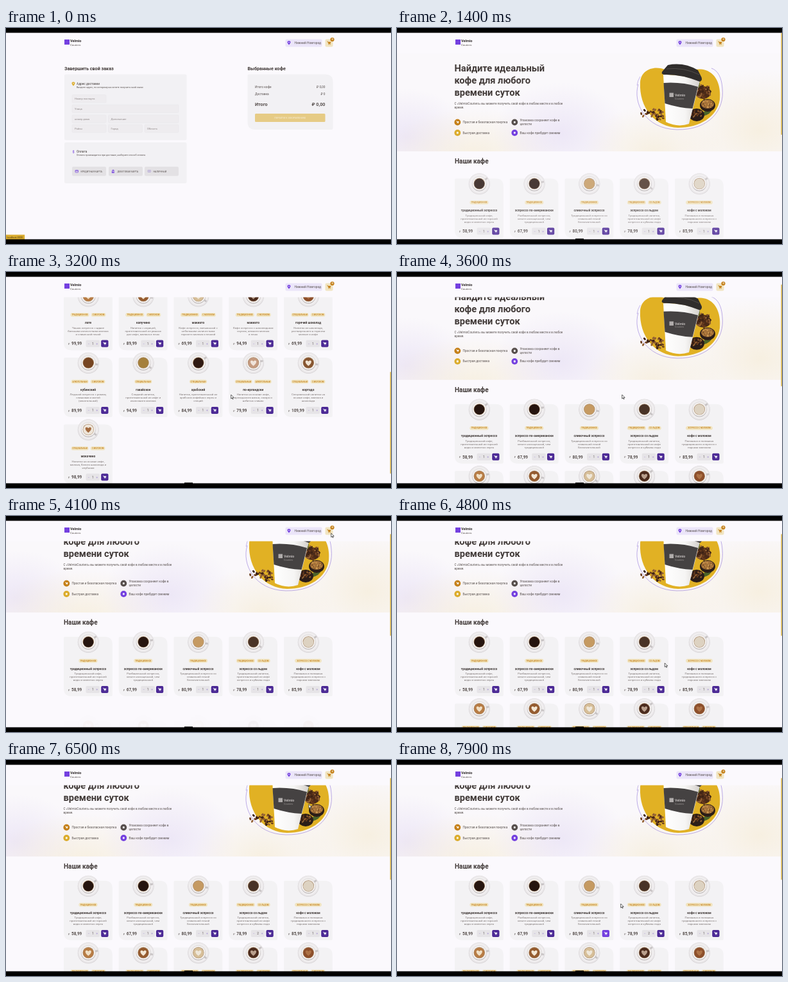
An HTML page that plays this animation: 600x338 px, repeating every 8 s.

```html
<!DOCTYPE html>
<html lang="ru">
<head>
<meta charset="utf-8">
<style>
html, body { margin: 0; width: 100%; height: 100%; overflow: hidden; background: #000; }
svg { display: block; width: 600px; height: 338px; }
text { font-family: Roboto, "Noto Sans", sans-serif; }
</style>
</head>
<body>
<svg id="stage" viewBox="0 0 600 338"></svg>
<script>
const PURPLE = '#7440df', DEEP = '#4b2995', BROWN = '#c47f17', GOLD = '#dbac2c', INK = '#574f4d', DARK = '#403937';
const ROW = 104.5, COL = 85.75;

const rect = (x, y, w, h, fill, r = 0, extra = '') =>
  `<rect x="${x}" y="${y}" width="${w}" height="${h}" rx="${r}" fill="${fill}" ${extra}/>`;
const dot = (x, y, r, fill, extra = '') => `<circle cx="${x}" cy="${y}" r="${r}" fill="${fill}" ${extra}/>`;
const oval = (x, y, rx, ry, fill, extra = '') =>
  `<ellipse cx="${x}" cy="${y}" rx="${rx}" ry="${ry}" fill="${fill}" ${extra}/>`;
const path = (d, fill, extra = '') => `<path d="${d}" fill="${fill}" ${extra}/>`;
const text = (x, y, size, str, fill = INK, weight = 400, anchor = 'start', extra = '') =>
  `<text x="${x}" y="${y}" font-size="${size}" fill="${fill}" font-weight="${weight}" text-anchor="${anchor}" ${extra}>${str}</text>`;

// Panel with large top-right and bottom-left corners
const leaf = (x, y, w, h, fill) => path(
  `M${x + 2} ${y}h${w - 14}q12 0 12 12v${h - 14}q0 2-2 2h${14 - w}q-12 0-12-12v${14 - h}q0-2 2-2z`, fill);
const cart = (x, y, s, color) => `<g transform="translate(${x} ${y}) scale(${s})">` +
  path('M-3-2.6h1.2l1.2 3.5h2.7l.9-2.5h-4.3', color, `stroke="${color}" stroke-width=".7"`) +
  dot(-.3, 2.2, .6, color) + dot(2, 2.2, .6, color) + '</g>';
const pin = (x, y, color) => path(`M${x} ${y + 3}c-5-5.5-1-6.5 0-6.2c1-.3 5 .7 0 6.2z`, color) +
  dot(x, y - 1, .8, '#fff');

function header() {
  return rect(0, 7, 600, 32.5, '#fbf9fd') + rect(91, 18, 8, 8, PURPLE) +
    text(100, 22.3, 5.5, 'Velmio', '#2f2a2a', 700) + text(100, 27.8, 4.4, 'Couriers', INK) +
    rect(435.5, 17.5, 57, 12, '#ebe5f9', 2) + pin(441, 23.5, PURPLE) +
    text(449.5, 25.3, 4.85, 'Нижний Новгород', INK) +
    rect(497.5, 17.5, 12, 12, '#f1e5c2', 2) + cart(503.2, 23.6, .95, BROWN) +
    dot(508.5, 18, 3.1, BROWN) + text(508.5, 19.4, 3.9, '0', '#fff', 700, 'middle', 'id="badge"');
}

function checkout() {
  const field = (x, y, w, label) =>
    rect(x, y, w, 12.5, '#eeecef', 1.5, 'stroke="#e7e5e9" stroke-width=".5"') +
    text(x + 4, y + 7.7, 4.1, label, '#8d8686');
  const pay = (x, icon, label) => rect(x, 217, 53, 14.5, '#e3e1e4', 2) + icon +
    text(x + 13.5, 225.6, 3.6, label, INK);
  const line = (y, size, a, b, weight) => text(388, y, size, a, INK, weight) +
    text(497.5, y, size, b, INK, weight, 'end');
  return text(91, 66.3, 7.2, 'Завершить свой заказ', DARK, 600) +
    text(376.5, 66.3, 7.2, 'Выбранные кофе', DARK, 600) +
    rect(91, 72.5, 190.5, 103, '#f2f1f4', 2) + rect(91, 179, 190.5, 64, '#f2f1f4', 2) +
    pin(105, 87.8, GOLD) + text(110, 89.3, 4.8, 'Адрес доставки', DARK) +
    text(110, 94.3, 3.7, 'Введите адрес, по которому вы хотите получить свой заказ') +
    field(103, 104.5, 53, 'Номер паспорта') + field(103, 120, 166, 'Улица') +
    field(103, 136, 53, 'номер дома') + field(159.5, 136, 109.5, 'Дополнение') +
    field(103, 151, 53, 'Район') + field(159.5, 151, 53, 'Город') + field(216, 151, 53, 'Область') +
    text(105, 196, 5.5, '$', PURPLE, 500, 'middle') + text(110, 195.3, 4.8, 'Оплата', DARK) +
    text(110, 200.3, 3.7, 'Оплата производится при доставке, выберите способ оплаты') +
    pay(103, rect(108, 222.5, 4.5, 3.5, 'none', .5, `stroke="${PURPLE}" stroke-width=".7"`) +
      rect(108, 223.5, 4.5, .7, PURPLE), 'КРЕДИТНАЯ КАРТА') +
    pay(160, path('M164.5 223.5l2.5-2 2.5 2zm.6.5h.9v2h.7v-2h.9v2h.7v-2h.5v3h-4z', PURPLE), 'ДЕБЕТОВАЯ КАРТА') +
    pay(216, rect(221, 222.5, 4.5, 3, 'none', .3, 'stroke="#a18fd0" stroke-width=".6"') +
      dot(223.2, 224, .8, '#a18fd0'), 'НАЛИЧНЫЙ') +
    leaf(376.5, 72.5, 133, 86.5, '#f2f1f4') +
    line(94.3, 4.8, 'Итого кофе', '₽ 0,00', 400) + line(105, 4.8, 'Доставка', '₽ 0', 400) +
    line(122, 7.2, 'Итого', '₽ 0,00', 700) + rect(388, 134, 109.5, 13, '#e6cb85', 1.5) +
    text(442.7, 142, 3.8, 'ПЕРЕЙТИ К ОФОРМЛЕНИЮ', '#f7eed8', 400, 'middle');
}

function cupScene() {
  let seed = 7;
  const rnd = () => (seed = seed * 16807 % 2147483647) / 2147483647;
  const beans = (n, x, y, rx, ry, r, colors) => {
    let s = '';
    for (let i = 0; i < n; i++) {
      const a = rnd() * 6.283, d = Math.sqrt(rnd());
      const bx = x + Math.cos(a) * d * rx, by = y + Math.sin(a) * d * ry;
      s += oval(bx.toFixed(1), by.toFixed(1), r, r * .65, colors[i % colors.length],
        `transform="rotate(${Math.round(rnd() * 180)} ${bx.toFixed(1)} ${by.toFixed(1)})"`);
    }
    return s;
  };
  const browns = ['#3a2015', '#6b3d1e', '#936033'], tan = ['#c88f48', '#714821', '#dbaa5d'];
  return path('M379 85C380 66 400 57 420 66C448 76 460 60 481 66C499 72 505 92 503 112C499 139 472 156 438 156C402 155 377 125 379 85z', '#e1b124') +
    path('M376 88C367 117 387 158 436 159C487 160 511 128 507 94C506 78 500 66 490 63', 'none', 'stroke="#a18adf" stroke-width=".7"') +
    path('M374 90q1-8 5-14', 'none', 'stroke="#a18adf" stroke-width=".6"') +
    path('M476 134q7-9 16-8q-3 9-15 12z', '#4d6429') + path('M464 96q2-9 8-11v12z', '#66742f') +
    oval(477, 101, 12, 10, '#4b2a18') + beans(45, 477, 99, 12, 12, 1.8, browns) +
    oval(484, 121, 12, 10, '#2b1d18') + oval(484, 119, 10, 7, '#a47139') + beans(35, 484, 119, 9, 6, 1, tan) +
    oval(467, 136, 12, 10, '#2b1d18') + beans(28, 467, 134, 9, 6, 1.7, browns) +
    beans(24, 397, 134, 18, 8, 2.3, browns) + beans(14, 413, 140, 9, 6, 2.1, browns) +
    path('M415 73Q445 72 472 83L455 150Q437 156 419 147z', 'url(#paper)') +
    path('M415.500 86Q443 84 469 92L460.500 126Q439 125 417.500 118z', '#454242') +
    path('M422 58Q447 53 469 66L474 76Q477 81 472 84Q443 72 416 73Q411 72 413.500 68z', '#302d2c') +
    path('M420 64Q447 61 471 73', 'none', 'stroke="#5a5654" stroke-width=".8"') +
    rect(424.5, 101.5, 6.5, 6.5, '#b0acab') +
    text(433, 107, 5.2, 'Velmio', '#bbb7b6', 600) + text(433, 111.5, 3.8, 'Couriers', '#9b9695');
}

function hero() {
  const feature = (x, y, color, ...lines) => dot(x, y, 4.9, color) +
    (color === BROWN ? cart(x, y, .7, '#fff') : rect(x - 1.4, y - 1.6, 2.8, 3.2, '#fff', 1)) +
    lines.map((s, i) => text(x + 8.2, y + 1.6 + (lines.length - 1) * -2.9 + i * 5.7, 4.8, s)).join('');
  const glow = (x, y, rx, ry, id) => oval(x, y, rx, ry, `url(#${id})`);
  return '<g clip-path="url(#heroClip)">' + rect(0, 7, 600, 186, '#faf8fb') +
    glow(15, 170, 100, 75, 'lilac') + glow(120, 200, 140, 75, 'cream') + glow(255, 165, 105, 80, 'lilac') +
    glow(400, 195, 110, 75, 'cream') + glow(565, 160, 130, 95, 'cream') + '</g>' +
    ['Найдите идеальный', 'кофе для любого', 'времени суток'].map((s, i) =>
      text(89.5, 68 + 19 * i, 14.6, s, DARK, 600)).join('') +
    text(89.5, 120, 4.7, 'С «VelmioCouriers» вы можете получить свой кофе в любом месте и в любое') +
    text(89.5, 126.2, 4.7, 'время.') +
    feature(94.3, 147.5, BROWN, 'Простая и безопасная покупка') +
    feature(183.3, 147.5, INK, 'Упаковка сохраняет кофе в', 'целости') +
    feature(94.3, 164, GOLD, 'Быстрая доставка') +
    feature(183.3, 164, PURPLE, 'Ваш кофе прибудет свежим') + cupScene();
}

// name; tags; description; price; coffee colour; foam colour
const TAGS = { t: 'ТРАДИЦИОННОЕ', m: 'С МОЛОКОМ', i: 'СО ЛЬДОМ', e: 'ЭСПРЕССО С МОЛОКОМ', s: 'СПЕЦИАЛЬНЫЙ', a: 'АЛКОГОЛЬНЫЙ' };
const MENU = `традиционный эспрессо;t;Традиционный кофе,|приготовленный из горячей|воды и молотых зерен;58,99;#26150f
эспрессо по-американски;t;Разбавленный эспрессо,|менее насыщенный, чем|традиционный;67,99;#26150f
сливочный эспрессо;t;Традиционный эспрессо со|сливочной пеной|Безалкогольный;80,99;#c59a62
эспрессо со льдом;ti;Традиционный напиток,|приготовленный из кофе|эспрессо и кубиков льда;78,99;#493326
кофе с молоком;e;Половина и половина|традиционного эспрессо с|парным молоком;85,99;#ddd2c1
лате;tm;Чашка эспрессо с вдвое|большим количеством молока|и сливочной пеной;99,99;#b77c45;#f0dfc4
капучино;tm;Напиток с корицей,|приготовленный из равных|доз кофе, молока и пены;89,99;#955c30;#f3e7d4
макиато;tm;Кофе эспрессо, смешанный с|небольшим количеством|горячего молока и пенкой;69,99;#d6be98;#efe7d9
макиато;tm;Кофе эспрессо с шоколадным|соусом, немного молока|и пены;94,99;#4c2c1e;#b99f8c
горячий шоколад;sm;Напиток из шоколада,|растворенного в горячем|молоке и кофе;69,99;#8d4f2b;#ad7246
кубинский;am;Ледяной эспрессо с ромом,|сливками и мятой|(алкогольный);89,99;#764522
гавайское;s;Сладкий напиток,|приготовленный из кофе и|кокосового молока;94,99;#a5803c
арабский;s;Напиток, приготовленный из|арабских кофейных зерен и|специй;84,99;#301a12
по-ирландски;sa;Напиток на основе кофе,|ирландского виски, сахара и|взбитых сливок;79,99;#c59b80;#f0e4da
кортадо;sm;Специальный напиток на|основе кофе, молока и|шоколада;109,99;#875631;#f1e4d3
мокачино;sm;Напиток на основе кофе,|молока, белого шоколада и|клубники;98,99;#eee5d9;#a36b40`.split('\n').map(s => s.split(';'));

function cup(x, y, coffee, foam, i) {
  const a = -.6 + (i % 4) * .4, hx = x + 14 * Math.cos(a), hy = y + 14 * Math.sin(a);
  return dot(x, y + .5, 16.6, '#d6d3d5') + dot(x, y, 16.2, 'url(#china)') +
    `<path d="M${x} ${y}L${hx} ${hy}" stroke="#c9c5c6" stroke-width="3" stroke-linecap="round"/>` +
    dot(x, y + 1, 11, '#bdb8b9') + dot(x, y, 10.8, '#f3f0ee') + dot(x, y, 8.7, '#a98a6c') + dot(x, y + .2, 8.1, coffee) +
    (foam ? path(`M${x} ${y + 5}C${x - 8} ${y - 1} ${x - 4} ${y - 6} ${x} ${y - 2}C${x + 4} ${y - 6} ${x + 8} ${y - 1} ${x} ${y + 5}z`, foam) : '');
}

function card([name, tags, about, price, coffee, foam], i) {
  const x = 90 + COL * (i % 5), cx = x + 38;
  const labels = [...tags].map(k => TAGS[k]), width = s => s.length * 2.1 + 4;
  let tx = cx - (labels.reduce((sum, s) => sum + width(s), 0) + 3 * (labels.length - 1)) / 2;
  let s = leaf(x, 231, 75.8, 93, '#f3f2f4') + cup(cx + .3, 239, coffee, foam, i);
  for (const label of labels) {
    const w = width(label);
    s += rect(tx, 265.5, w, 6, '#f1e5c2', 3) + text(tx + w / 2, 269.6, 3.1, label, BROWN, 500, 'middle');
    tx += w + 3;
  }
  return s + text(cx, 282.5, 4.85, name, DARK, 700, 'middle') +
    about.split('|').map((line, n) => text(cx, 290.3 + 5 * n, 4.35, line, '#7c7473', 400, 'middle')).join('') +
    text(x + 7, 315.5, 3.5, '₽') + text(x + 12, 315.7, 6.4, price, INK, 700) +
    rect(x + 34.5, 308, 21.5, 11, '#e6e4e7', 2) +
    text(x + 39, 315.2, 4.8, '−', '#9a83cf', 400, 'middle') +
    text(x + 45.3, 315.3, 4.8, '1', INK, 400, 'middle', `id="qty${i}"`) +
    text(x + 51.8, 315.2, 4.8, '+', '#9a83cf', 400, 'middle') +
    rect(x + 58.2, 308, 11.3, 11, DEEP, 2, `id="buy${i}"`) + cart(x + 63.6, 313.6, .82, '#fff');
}

function build() {
  const glow = (id, color) => `<radialGradient id="${id}"><stop stop-color="${color}" stop-opacity=".65"/>
    <stop offset="1" stop-color="${color}" stop-opacity="0"/></radialGradient>`;
  const rows = [0, 1, 2, 3].map(r => `<g id="row${r}">` +
    MENU.slice(r * 5, r * 5 + 5).map((item, c) => card(item, r * 5 + c)).join('') + '</g>').join('');
  return `<defs>${glow('lilac', '#e6def4')}${glow('cream', '#f5ebd3')}
    <radialGradient id="china"><stop offset=".6" stop-color="#d5d1d3"/><stop offset=".8" stop-color="#f3f1f2"/><stop offset="1" stop-color="#e6e3e5"/></radialGradient>
    <linearGradient id="paper"><stop stop-color="#fff"/><stop offset=".6" stop-color="#f6f5f4"/><stop offset="1" stop-color="#d4d0cc"/></linearGradient>
    <clipPath id="heroClip"><rect y="7" width="600" height="186"/></clipPath></defs>` +
    rect(0, 7, 600, 324, '#fbf9fd') + `<g id="order">${checkout()}</g>
    <g id="page">${hero()}${text(90, 211.8, 10, 'Наши кафе', DARK, 600)}${rows}</g>` + header() +
    `<g id="chrome">${rect(598.6, 8, 1.4, 159, '#d9b23f', 0, 'id="thumb"')}${rect(278, 329.5, 13, 2, '#000')}</g>
    <g id="status">${rect(0, 323.5, 29, 7.5, '#d9ab2e', 0, 'id="statusBox"')}${text(1.5, 328.7, 3.7, '', '#4b3a12', 400, 'start', 'id="statusText"')}</g>` +
    path('M0 0v6.2l1.5-1.3 1 2.2 1-.5-1-2.1h2z', '#fff', 'id="cursor" stroke="#222" stroke-width=".7"') +
    rect(0, 0, 600, 7.5, '#000') + rect(0, 330.6, 600, 7.4, '#000');
}

const stage = document.getElementById('stage');
stage.innerHTML = build();
const $ = id => document.getElementById(id);
const clamp = v => Math.max(0, Math.min(1, v));
const show = (id, on) => $(id).style.display = on ? '' : 'none';
const smooth = p => p * p * (3 - 2 * p);

// Keys are [time, value, ...]
function track(keys, t, ease = p => p) {
  let i = 0;
  while (i < keys.length - 2 && t >= keys[i + 1][0]) i++;
  const a = keys[i], b = keys[i + 1], p = ease(clamp((t - a[0]) / (b[0] - a[0])));
  return a.slice(1).map((v, n) => v + (b[n + 1] - v) * p);
}
const SCROLL = [[1850, 0], [2200, 143], [2850, 306], [3250, 306], [3630, 0], [3750, 0], [3950, 42]];
const MOUSE = [[1600, 105, 30], [2000, 351, 195], [3650, 351, 195], [4050, 507, 30], [4500, 507, 28],
  [4900, 401, 271], [5050, 401, 271], [5200, 410, 271], [5550, 410, 271], [5800, 509, 38], [5900, 505, 28],
  [6350, 505, 28], [6900, 325, 271], [7650, 325, 271], [7900, 349, 228], [8000, 353, 222]];

// Address shown while a link is hovered
function hoveredLink(t) {
  if (t < 900) return 'localhost:3000';
  return t >= 4200 && t < 4700 || t >= 6000 && t < 6500 ? 'localhost:3000/checkout' : '';
}

function draw(t) {
  const atHome = t >= 1000, [scroll] = track(SCROLL, t), [mx, my] = track(MOUSE, t, smooth), link = hoveredLink(t);
  show('order', !atHome);
  show('page', atHome);
  show('chrome', atHome);
  show('status', link);
  $('statusText').textContent = link;
  $('statusBox').setAttribute('width', 2.5 + link.length * 1.9);
  $('page').setAttribute('transform', `translate(0 ${-scroll})`);
  $('thumb').setAttribute('y', 8 + scroll * .485);
  [980, t < 3650 ? 2075 : 4080, 2300, 2550].forEach((start, r) => {
    const p = clamp((t - start) / 500);
    $('row' + r).setAttribute('transform', `translate(0 ${r * ROW + 28 * (1 - p)})`);
    $('row' + r).setAttribute('opacity', p);
  });
  $('buy3').setAttribute('fill', t >= 5100 && t < 5900 ? PURPLE : DEEP);
  $('buy2').setAttribute('fill', t >= 6850 ? PURPLE : DEEP);
  $('qty3').textContent = t < 4950 ? 1 : 2;
  $('badge').textContent = t < 5450 ? 0 : t < 7500 ? 2 : 3;
  show('cursor', t >= 1600);
  $('cursor').setAttribute('transform', `translate(${mx - .3} ${my - 3})`);
}

function tick() {
  draw(Math.floor(performance.now() % 8000 / 100) * 100);
  requestAnimationFrame(tick);
}
tick();
</script>
</body>
</html>
```
